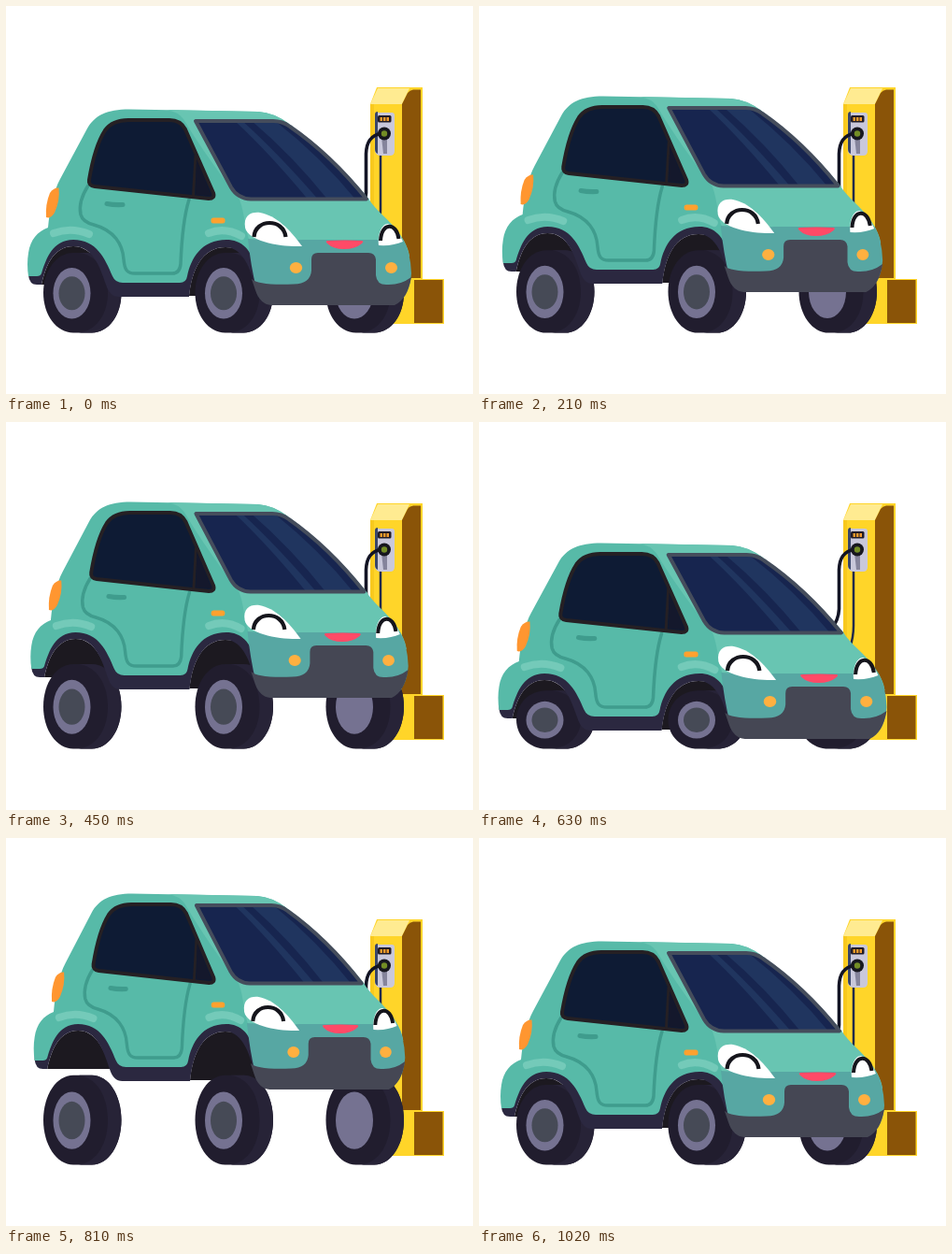
An HTML page that plays this animation: 500 px wide and 415 px high, repeating every 1.05 s.

```html
<!DOCTYPE html>
<html lang="en">
<head>
<meta charset="utf-8">
<title>Charging car</title>
<style>
  html, body { margin: 0; width: 100%; height: 100%; overflow: hidden; background: #fff; }
  svg { display: block; width: 100vw; height: 100vh; }
  .line { fill: none; stroke-linecap: round; stroke-linejoin: round; }
  .flat { stroke-linecap: butt; }
</style>
</head>
<body>
<svg viewBox="0 0 500 415">
  <defs>
    <path id="tyre" d="M72 252.500H92C110 252.500 123.500 274 123.500 301S110 349.500 92 349.500H72C54 349.500 40 328 40 301S54 252.500 72 252.500Z" fill="#211d2e"/>
    <path id="tread" d="M78 252.500H92C110 252.500 123.500 274 123.500 301S110 349.500 92 349.500H78C97 347 109 327 109 301S97 255 78 252.500Z" fill="#272337"/>
    <g id="wheel">
      <use href="#tyre"/><use href="#tread"/>
      <ellipse cx="70.500" cy="301.500" rx="20" ry="31" fill="#757291"/>
    </g>
    <ellipse id="cap" cx="70.500" cy="301.500" rx="14" ry="20.500" fill="#464a56"/>
    <path id="pane" d="M203 123H286Q296 123 304 129C336 151 363 178 386 206.500H262Q248 206 241 194Z"/>
    <clipPath id="glass"><use href="#pane"/></clipPath>
  </defs>

  <g id="charger">
    <path d="M397 87H446V292H469V340H390V105Z" fill="#ffd529"/>
    <path d="M398 88H432L424 105H390Z" fill="#ffeb91"/>
    <path d="M424 105L430 93Q432 90 436 89.500H444V291H424Z" fill="#8a5408"/>
    <path d="M390 105H394V339H390Z" fill="#f8c91e"/>
    <rect x="437" y="293" width="30.500" height="46" fill="#8a5408"/>
    <path class="line" d="M401 155V218Q401 230 397 242" stroke="#20294b" stroke-width="2.500"/>
    <path d="M396 114H413Q416 114 416 117V155Q416 160 411 160H401Q396 160 395 155Z" fill="#c9c8db"/>
    <path d="M395 116Q395 113 398 113V158Q395 157 395 153Z" fill="#39456a"/>
    <rect x="398" y="117" width="14.500" height="7.500" rx="1.500" fill="#211c26"/>
    <path d="M400.500 119h2.500v4h-2.500zM404 119h2.500v4H404zM407.500 119h2.500v4h-2.500z" fill="#f39a2b"/>
    <path d="M402 140H408V158H404Z" fill="#85849c"/>
    <path class="line" d="M403 136C390 138 386 146 385.500 158V200Q385 212 377 222" stroke="#131424" stroke-width="3.600"/>
    <circle cx="405" cy="136.500" r="7" fill="#17171f"/>
    <circle cx="405" cy="136.500" r="3.200" fill="#738d25"/>
  </g>

  <g class="car" fill="#1c1920">
    <path d="M38 298C42 280 50 257 72 257S102 282 109 298Z"/>
    <path d="M196 310C199 282 210 258 235 258S262 282 272 310Z"/>
  </g>

  <g id="wheels">
    <g><use href="#wheel"/><use href="#cap"/></g>
    <g transform="translate(162.500)"><use href="#wheel"/><use href="#cap"/></g>
    <use href="#wheel" transform="translate(302.500)"/>
  </g>

  <g class="car">
    <path d="M24 280V288Q25 298 33 298H38C42 280 50 257 72 257S101 281 107 298Q111 311 121 311H196C199 282 210 258 235 258C254 258 263 282 270 312V240H60Z" fill="#2b2840"/>
    <path d="M24 289Q22 276 24 264C26 250 34 241 45 237C47 216 51 198 58 185L87 131C95 117 108 110.500 132 110.500L270 113Q287 114 303 126C337 150 364 177 389 207L392 262L268 282C263 260 252 250 236 250C209 250 198 270 194 289Q193 296 186 296H125Q117 296 114 289C106 270 97 250 72 250C50 250 43 270 38 286Q37 289 33 289Z" fill="#57baa8"/>
    <path d="M172 111L270 113Q287 114 303 126L204 122L240 190L262 206H388C396 219 411 229 420 242C427 251 431 260 432 268L264 268L263 257C255 240 256 222 250 207C232 183 207 150 190 121Q184 113 172 111Z" fill="#68c5b2"/>

    <path class="line" d="M88 192C81 203 78 214 80 223Q82 231 94 234C116 240 125 255 126 271C127 283 130 286 138 286H178Q186 286 187 276C188 250 190 226 196 207" stroke="#3f9c8d" stroke-width="3.500"/>
    <path class="line" d="M108 211.500Q116 213 125 212.500" stroke="#3f9c8d" stroke-width="5"/>
    <path class="line" d="M51 243Q70 236 89 244M217 243Q234 236 252 246" stroke="#74cab9" stroke-width="8"/>

    <path d="M89 186C92 168 97 147 106 133Q114 122 131 122H175Q187 122 192 132L222 200Q224 206 217 206L95 193Q88 192 89 186Z" fill="#0e1b34" stroke="#252024" stroke-width="4"/>
    <path class="line" d="M203 160L200.500 203" stroke="#252024" stroke-width="3"/>
    <path d="M204 164L220 203L203 202Z" fill="#14182c"/>

    <use href="#pane" fill="#17254f"/>
    <g clip-path="url(#glass)" fill="#20355f">
      <path d="M244 122H252Q292 158 336 209H325Q282 157 244 122Z"/>
      <path d="M262 122H287Q338 162 376 209H346Q308 161 262 122Z"/>
    </g>
    <use href="#pane" class="line" stroke="#454d5c" stroke-width="4"/>

    <path d="M47 200Q51 194 56.500 194.500Q58 208 52 221Q48 228 43 226Q42 212 47 200Z" fill="#ff9630"/>
    <rect x="219.500" y="226.500" width="15" height="6" rx="2.500" fill="#ffa12e"/>

    <path d="M259 249Q290 252 318 250H425Q433 262 434 286C433 302 427 314 416 319H284Q275 318 268 302Q262 278 259 249Z" fill="#57a7a3"/>
    <path d="M263 292Q270 299 308 297.500Q326 297 327 283V271Q327 264 334 264H388Q395 264 396 271V288Q397 298 407 298Q422 299 434 290C431 306 426 315 416 320H284Q272 319 267 304Z" fill="#454754"/>

    <path d="M256 237C254 224 262 220 272 221C289 224 304 239 317 257C295 258 259 252 256 237Z" fill="#fff"/>
    <path class="line flat" d="M265.500 247C267 227 297 227 299.500 247" stroke="#15151c" stroke-width="4.200"/>
    <path d="M399 256C398 244 402 233 409 233C417 235 422 246 425 252Q414 257 399 256Z" fill="#fff"/>
    <path class="line flat" d="M401 251C402 231 418 231 420.500 249" stroke="#15151c" stroke-width="4"/>
    <path d="M345 251Q363 250 380 251Q384 251 381 254Q374 260 362 260Q350 260 344 254Q341 251 345 251Z" fill="#ff4a67"/>

    <ellipse cx="310.500" cy="280" rx="6.700" ry="6" fill="#ffb040"/>
    <ellipse cx="412.500" cy="280" rx="6.500" ry="6" fill="#ffb040"/>
  </g>
</svg>
<script>
  const STEP = 30, LOOP = 1050;
  const MID = 228, GROUND = 349.5, PEAK = -57;
  // Vertical offset of the body through one bounce; positive is down.
  const bounce = [0, 9, 16, 20, 19, 12, 0, -14, -29, -42, -51, -56, PEAK, -52, -41, -25, -12];

  const bodies = document.querySelectorAll('.car');
  const wheels = document.getElementById('wheels');

  function pose(ms) {
    const dy = bounce[Math.floor((ms % LOOP) / STEP) % bounce.length];
    const wide = 1 + dy * 0.00064;
    // Wheels give a little as the body falls, and much more below rest.
    const squash = 1 - (dy - PEAK) * 0.0021 - Math.max(0, dy) * 0.0105;
    for (const body of bodies) {
      body.setAttribute('transform', `translate(${MID * (1 - wide)} ${dy}) scale(${wide} 1)`);
    }
    wheels.setAttribute('transform', `translate(0 ${GROUND * (1 - squash)}) scale(1 ${squash})`);
  }

  const start = performance.now();
  function tick() {
    pose(performance.now() - start);
    requestAnimationFrame(tick);
  }
  pose(0);
  requestAnimationFrame(tick);
</script>
</body>
</html>
```
